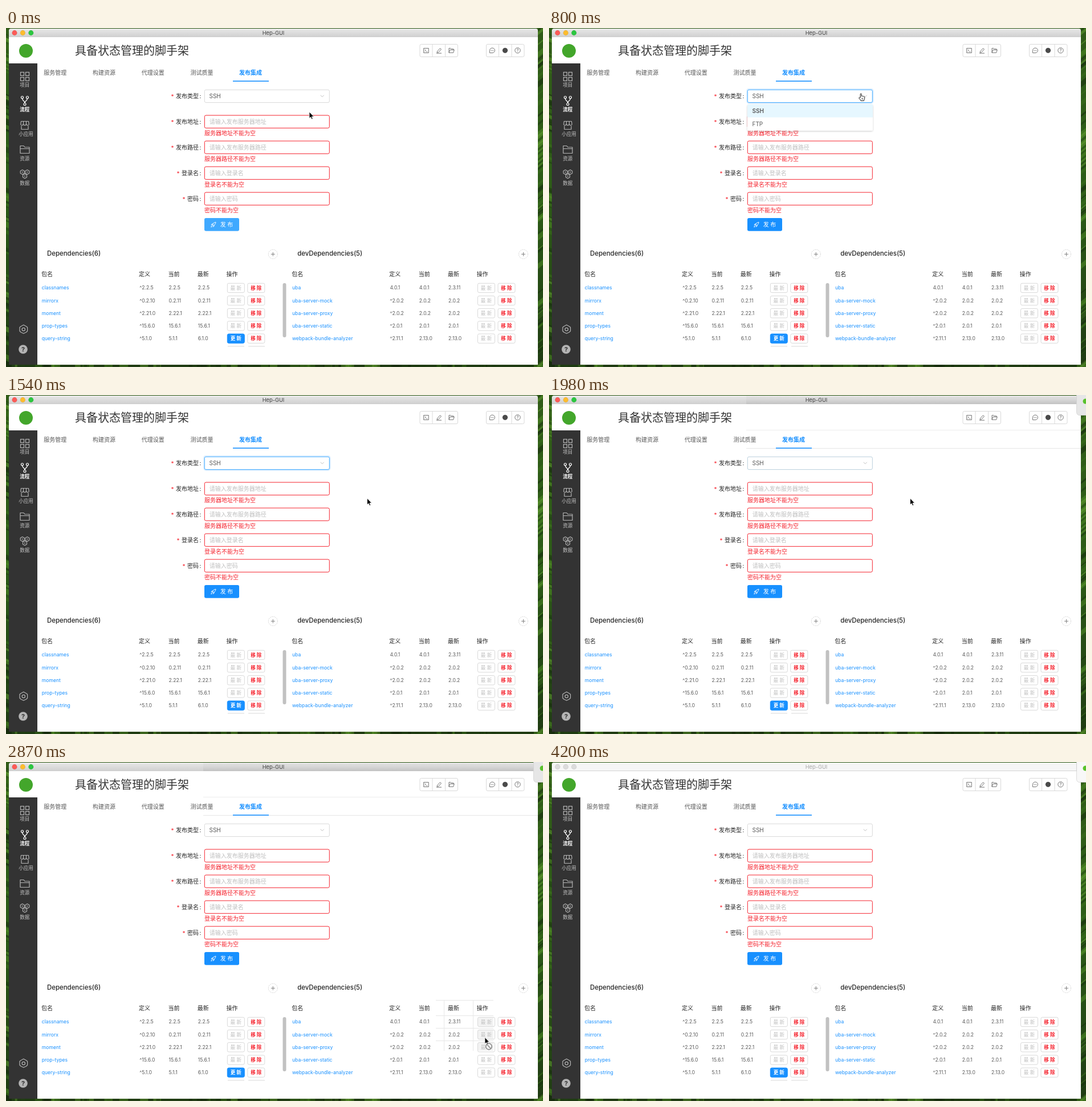
An HTML page that plays this animation: 942 by 594 pixels, repeating every 4300 ms.

```html
<!DOCTYPE html>
<html lang="zh-CN">
<head>
<meta charset="utf-8">
<title>Hep-GUI</title>
<style>
html, body { margin: 0; width: 100%; height: 100%; overflow: hidden; background: #fff; }
svg { display: block; width: 942px; height: 594px; }
text { font-family: Inter, "Noto Sans CJK SC", "Noto Sans CJK", sans-serif; white-space: pre; }
</style>
</head>
<body>
<svg id="stage" viewBox="0 0 942 594" xmlns="http://www.w3.org/2000/svg"></svg>
<script>
const LOOP = 4300;
const BLUE = '#1890ff', RED = '#f5222d', LINE = '#d9d9d9', INK = '#595959', DARK = '#262626';
const stage = document.getElementById('stage');

// ---- markup helpers ----
const rect = (x, y, w, h, fill, extra = '') =>
  `<rect x="${x}" y="${y}" width="${w}" height="${h}" fill="${fill}" ${extra}/>`;
const circle = (x, y, r, fill, extra = '') =>
  `<circle cx="${x}" cy="${y}" r="${r}" fill="${fill}" ${extra}/>`;
const path = (d, stroke, width = 1, fill = 'none') =>
  `<path d="${d}" fill="${fill}" stroke="${stroke}" stroke-width="${width}" stroke-linejoin="round"/>`;
// y is the optical middle of the line
const text = (s, x, y, size, fill, weight = 400, anchor = 'start') =>
  `<text x="${x}" y="${(y + size * 0.37).toFixed(2)}" font-size="${size}" fill="${fill}" font-weight="${weight}" text-anchor="${anchor}">${s}</text>`;
const box = (x, y, w, h, stroke, fill = 'none', r = 2.5) =>
  rect(x, y, w, h, fill, `rx="${r}" stroke="${stroke}"`);
const group = (id, body, extra = '') => `<g id="${id}" ${extra}>${body}</g>`;
const at = (x, y, body) => `<g transform="translate(${x} ${y})">${body}</g>`;

function wallpaper() {
  let seed = 11, out = rect(0, 0, 942, 594, 'url(#field)');
  const rnd = () => (seed = (seed * 16807) % 2147483647) / 2147483647;
  const tones = ['#4f8a24', '#1c3a10', '#3b6f1c', '#16290d', '#5f9a30'];
  for (let i = 0; i < 130; i++) {
    const y = rnd() * 594, h = 2 + rnd() * 9, c = tones[Math.floor(rnd() * 5)];
    const left = i % 2, x = left ? -1 : 932, dy = left ? 5 : -9;
    out += `<path d="M${x} ${y}l11 ${dy}v${h}l-11 ${-dy}z" fill="${c}" opacity=".55"/>`;
  }
  for (let i = 0; i < 70; i++) {
    out += rect(rnd() * 942, 590, 3 + rnd() * 14, 4, tones[Math.floor(rnd() * 5)], 'opacity=".45"');
  }
  return out;
}

function titleBar() {
  const lights = (a, b, c) => [a, b, c].map((f, i) =>
    circle(15 + i * 14.4, 8.5, 4.4, f, 'stroke="#000" stroke-opacity=".12" stroke-width=".6"')).join('');
  const name = fill => text('Hep-GUI', 469, 8.6, 9.3, fill, 400, 'middle');
  return rect(5, 1, 928, 20, 'url(#bar)', 'rx="3.5"') +
    group('barDark', rect(346, 1, 579, 15, 'url(#barDeep)')) +
    group('barActive', lights('#fc5b57', '#fdbc2e', '#2cc740') + name('#404040')) +
    group('barIdle', rect(5, 1, 921, 15, '#f6f6f6', 'rx="3.5"') + rect(5, 15, 921, 1, '#d4d4d4') +
      lights('#dcdcdc', '#dcdcdc', '#dcdcdc') + name('#a8a8a8') + rect(925, 1, 1, 15, '#b5b5b5'));
}

function sidebar() {
  const c = '#b4b4b4';
  const cells = [[0, 0], [9, 0], [0, 9], [9, 9]].map(([x, y]) =>
    rect(25.5 + x, 77.5 + y, 6, 6, 'none', `stroke="${c}" stroke-width="1.2"`)).join('');
  const ring = (x, y, s) => circle(x, y, 2, 'none', `stroke="${s}" stroke-width="1.2"`);
  const branch = ring(28.5, 121.5, '#fff') + ring(37.5, 121.5, '#fff') + ring(33, 133.5, '#fff') +
    path('M28.5 123.5C28.5 128 33 127 33 131.5C33 127 37.5 128 37.5 123.5', '#fff', 1.3);
  const shop = path('M26.5 163.5h13l.8 5.5q-2 3-4.8 0q-2.5 3-5 0q-2.800 3-4.800 0zM30.500 163.500v5.500M35.500 163.500v5.500M27 171.500v6h12v-6', c, 1.2);
  const folder = path('M25 219.500v-13h6l2 2.500h8v10.500zM25 211.500h16', c, 1.2);
  const hive = [[28.7, 252.5], [37.3, 252.5], [33, 259.5]].map(([x, y]) =>
    path(`M${x - 3.5} ${y - 2}l3.500-2l3.500 2v4l-3.500 2l-3.500-2z`, c, 1.1) + circle(x, y, 1, c)).join('');
  const labels = [['项目', 100], ['流程', 143], ['小应用', 186], ['资源', 229], ['数据', 272]].map(([s, y], i) =>
    text(s, i === 2 ? 35 : 32.7, y, 8.57, i === 1 ? '#fff' : '#c4c4c4', i === 1 ? 700 : 400, 'middle')).join('');
  const gear = path('M28.500 521.500l2.300-1.300l2.300 1.300l2.700 1.500l1.800 1.500v6.500l-2 2l-4.800 2.300l-4.800-2.300l-2-2v-6.500l1.800-1.500z', c, 1.2) +
    circle(30.800, 528, 2.700, 'none', `stroke="${c}" stroke-width="1.2"`);
  return rect(5, 62, 50, 528, '#333') + cells + branch + shop + folder + hive + labels + gear +
    circle(30, 563, 7.8, '#b4b4b4') + text('?', 30, 563.2, 11, '#333', 700, 'middle');
}

function header() {
  const g = '#666';
  const trio = x => box(x, 28.5, 66.5, 22, LINE) + path(`M${x + 22} 28.500v22M${x + 44.500} 28.500v22`, LINE);
  const icons =
    at(737, 39.5, path('M-4.300-4h8.600v8h-8.600zM-2.500-2l2 1.800l-2 1.800M.3 2h2', g, .9)) +
    at(759.5, 39.5, path('M-3 1.500l5-5.500l2 1.800l-5 5.400l-2.500.5zM-4.500 4.700h9', g, .9)) +
    at(781.5, 39.5, path('M-4.500 3.800v-7.800h3l1 1.300h4v2M-4.500 3.800l1.800-5h7.500l-1.600 5z', g, .9)) +
    at(853, 39.3, path('M-4.500 4.300v-4.300a4.500 4.300 0 1 1 4.500 4.300z', g, .9) +
      [-2, 0, 2].map(x => circle(x, 0, .65, g)).join('')) +
    circle(875.5, 39.3, 4.6, '#4a4a4a') +
    circle(897.5, 39.3, 4.7, 'none', `stroke="${g}" stroke-width=".9"`) + text('?', 897.5, 39.4, 7, g, 500, 'middle');
  const tabs = ['服务管理', '构建资源', '代理设置', '测试质量', '发布集成'].map((s, i) =>
    text(s, 66.3 + i * 85.7, 78.5, 10, i === 4 ? BLUE : INK, i === 4 ? 700 : 400)).join('');
  return circle(35, 40, 12, '#43a62b') + text('具备状态管理的脚手架', 121, 39.5, 20, '#333', 300) +
    trio(726) + trio(842.5) + icons +
    group('rules', rect(346, 61, 587, 1, '#ececec') + rect(346, 93, 587, 1, '#e6e6e6')) +
    tabs + rect(398, 92.3, 63, 1.6, BLUE);
}

function form() {
  const fields = [['发布类型'], ['发布地址', '请输入发布服务器地址', '服务器地址不能为空'],
    ['发布路径', '请输入发布服务器路径', '服务器路径不能为空'],
    ['登录名', '请输入登录名', '登录名不能为空'], ['密码', '请输入密码', '密码不能为空']];
  let out = '';
  fields.forEach(([label, hint, error], i) => {
    const y = 119.3 + i * 45;
    out += text('*', 334 - label.length * 10 - 4.5, y + .8, 10, RED) +
      text(label, 338, y, 10, DARK, 400, 'end') + text(':', 339.500, y, 10, DARK);
    if (!hint) return;
    out += box(348.3, y - 11.3, 219, 22.3, RED, '#fff') + text(hint, 356.7, y + .2, 10, '#bfbfbf') +
      text(error, 348, y + 20, 10, RED);
  });
  const select = rect(347, 106.8, 221.6, 25, 'none', 'id="glow" rx="3.500" stroke="#1890ff" stroke-opacity=".2" stroke-width="1.4"') +
    rect(348.3, 108.3, 219, 22.3, '#fff', 'id="select" rx="2.500"') + text('SSH', 356.5, 119.4, 10, INK) +
    `<path id="chevron" fill="none" stroke="#bfbfbf" stroke-width="1"/>`;
  const button = rect(348, 333, 61, 22.8, BLUE, 'id="publish" rx="2.800"') +
    at(364, 344.6, path('M-1.800.5q1-4.500 5.800-5q-.3 5-5 6zM-1.800.5l-2.200.2l1.600-2.300h1.500M-.8 1.500l.2 2.300l2-1.500v-1.500M-3.300 2.200l-1 2l2-.8', '#fff', .9)) +
    text('发 布', 387, 344.6, 10, '#fff', 500, 'middle');
  const menu = rect(348, 134, 220, 46, '#fff', 'rx="2.500" filter="url(#shadow)"') +
    rect(348, 134, 220, 22.6, '#e6f7ff') + text('SSH', 356.5, 145.2, 10, INK, 600) + text('FTP', 356.5, 168, 10, INK);
  return out + select + button + group('menu', menu);
}

const rowY = i => 455.3 + i * 22.17;

function table(dx, title, rows) {
  const pill = (x, y, s, stroke, fill, ink) => box(x, y - 8, 30, 16.3, stroke, fill) +
    text(s, x + 15, y + .2, 8.57, ink, ink === '#bfbfbf' ? 400 : 600, 'middle');
  let out = text(title, 72 + dx, 395.2, 11.43, DARK, 500);
  const px = 468.3 + dx;
  out += circle(px, 396.3, 8, '#fff', 'stroke="#ccc" stroke-width=".8" stroke-dasharray="2 1.200"') +
    path(`M${px - 3.5} 396.300h7M${px} 392.800v7`, '#777', .9);
  [['包名', 62], ['定义', 233], ['当前', 284.5], ['最新', 335.7], ['操作', 386.5]].forEach(([s, x]) => {
    out += text(s, x + dx, 431.5, 10, DARK, 500);
  });
  rows.forEach((row, i) => {
    const [name, ...versions] = row.split(' '), y = rowY(i), stale = name === 'query-string';
    out += text(name, 62.8 + dx, y, 8.57, BLUE);
    versions.forEach((v, k) => out += text(v, 234.2 + dx + k * 51.3, y, 8.57, INK));
    out += (stale ? pill(388.3 + dx, y, '更 新', BLUE, BLUE, '#fff')
      : pill(388.3 + dx, y, '最 新', LINE, 'none', '#bfbfbf')) +
      pill(423.8 + dx, y, '移 除', LINE, 'none', RED);
  });
  return out;
}

function grid() {
  let out = '';
  for (let i = 0; i < 5; i++)
    for (const x of [827.3, 862.8]) out += rect(x, rowY(i) - 8, 30, 16.3, '#f3f3f3', 'rx="2.500"');
  [417, 444, 466, 488, 510, 532, 555].forEach(y => out += rect(502, y, 408, 1, '#e6e6e6'));
  [666, 717, 768, 819].forEach(x => out += rect(x, 417, 1, 138, '#e8e8e8'));
  return out;
}

const patches = [[2870, 754, 417, 101, 89], [3010, 502, 469, 391, 79], [3160, 530, 488, 375, 72]];

function pointers() {
  const arrow = '<path d="M0 0v11.300l2.600-2.300l1.700 3.900l1.900-.8l-1.700-3.800h3.500z" fill="#000" stroke="#fff" stroke-width=".8"/>';
  const hand = '<path d="M3.200 7.500v-5.800q0-1.200 1-1.200t1.100 1.200v3.200q1.800-.7 2.200.4q1.500-.5 1.900.6q1.400-.2 1.400 1.200q0 2.800-1.500 5.800h-5.300q-.8-2-3.500-4.800q.9-1.700 2.700-.6z" fill="#fff" stroke="#000" stroke-width=".9" stroke-linejoin="round"/>' +
    path('M5.800 8v3M7.500 8v3', '#000', .6);
  const ban = circle(7, 16, 5.3, '#fff', 'fill-opacity=".6" stroke="#8c8c8c" stroke-width="1.700"') + path('M3.300 12.300l7.400 7.400', '#8c8c8c', 1.5);
  return group('pointer', group('hand', hand) + group('arrow', arrow) + group('ban', ban));
}

stage.innerHTML = `<defs>
  <linearGradient id="field" x2="0" y2="1"><stop stop-color="#315c18"/><stop offset=".5" stop-color="#2d5c17"/><stop offset="1" stop-color="#203c13"/></linearGradient>
  <linearGradient id="bar" x2="0" y2="1"><stop stop-color="#e9e9e9"/><stop offset=".72" stop-color="#d0d0d0"/><stop offset=".78" stop-color="#b8b8b8"/></linearGradient>
  <linearGradient id="barDeep" x2="0" y2="1"><stop stop-color="#e4e4e4"/><stop offset=".5" stop-color="#d6d6d6"/><stop offset="1" stop-color="#c2c2c2"/></linearGradient>
  <filter id="shadow" x="-10%" y="-20%" width="120%" height="150%"><feDropShadow dx="0" dy="1" stdDeviation="1.800" flood-opacity=".2"/></filter>
  ${patches.map(([, x, y, w, h], i) => `<clipPath id="cut${i}">${rect(x, y, w, h, '#000')}</clipPath>`).join('')}
</defs>` + wallpaper() + titleBar() + rect(5, 16, 928, 574, '#fff') + sidebar() + header() + form() +
  patches.map((p, i) => group('patch' + i, grid(), `clip-path="url(#cut${i})"`)).join('') +
  table(0, 'Dependencies(6)', ['classnames ^2.2.5 2.2.5 2.2.5', 'mirrorx ^0.2.10 0.2.11 0.2.11',
    'moment ^2.21.0 2.22.1 2.22.1', 'prop-types ^15.6.0 15.6.1 15.6.1', 'query-string ^5.1.0 5.1.1 6.1.0']) +
  path('M389 557.800h29M425 557.800h29', LINE) +
  rect(485.5, 447, 6, 95, '#c1c1c1', 'rx="3"') +
  table(439.2, 'devDependencies(5)', ['uba 4.0.1 4.0.1 2.3.11', 'uba-server-mock ^2.0.2 2.0.2 2.0.2',
    'uba-server-proxy ^2.0.2 2.0.2 2.0.2', 'uba-server-static ^2.0.1 2.0.1 2.0.1',
    'webpack-bundle-analyzer ^2.11.1 2.13.0 2.13.0']) +
  group('toast', rect(925.5, -8, 30, 43.5, '#e9e9e9', 'id="toastBox" rx="5" stroke="#cfcfcf" stroke-width=".7"') +
    circle(941, 11, 4.5, '#59c22c')) +
  pointers();

// ---- timeline: each entry holds until the next ----
const moves = [[0, 'arrow', 532, 147], [140, 'arrow', 539.5, 133], [350, 'hand', 543, 114.5], [1250, 'hand', 547, 115],
  [1400, 'arrow', 629.5, 177.5], [1540, 'arrow', 633.5, 181], [2570, 'arrow', 635, 181], [2720, 'arrow', 756, 349],
  [2870, 'ban', 840, 482.5], [3010, 'arrow', 885, 535], [3160, 'arrow', 896, 581.5], [3300, 'arrow', 902, 587.5], [3450, '']];
const borders = [[0, LINE], [350, '#8cc8fa'], [500, '#40a9ff'], [1980, '#b9cfdd'], [2130, LINE]];
const menuSteps = [[0, 0, 1], [500, .6, .9], [650, .96, .99], [800, 1, 1], [1400, .9, .95], [1540, 0, 1]];
const buttonFill = [[0, '#40a9ff'], [140, '#2c9dff'], [650, BLUE]];
const held = (steps, t) => steps.filter(s => s[0] <= t).pop();

const el = id => document.getElementById(id);
const show = (id, on) => el(id).setAttribute('display', on ? 'inline' : 'none');
const set = (id, key, value) => el(id).setAttribute(key, value);

function draw(t) {
  const idle = t >= 4200, late = t >= 1980 && !idle;
  show('barDark', late);
  show('barActive', !idle);
  show('barIdle', idle);
  show('rules', late);
  show('toast', t >= 1980);
  set('toastBox', 'fill', idle ? '#f8f8f8' : '#e6e6e6');

  set('select', 'stroke', held(borders, t)[1]);
  show('glow', t >= 650 && t < 1980);
  const up = t >= 950 && t < 1400;
  set('chevron', 'd', up ? 'M551.800 120.700l2.900-3l2.900 3' : 'M551.800 117.700l2.900 3l2.900-3');
  set('publish', 'fill', held(buttonFill, t)[1]);

  const [, alpha, scale] = held(menuSteps, t);
  show('menu', alpha > 0);
  set('menu', 'opacity', alpha);
  set('menu', 'transform', `translate(0 ${134 * (1 - scale)}) scale(1 ${scale})`);

  patches.forEach(([start], i) => show('patch' + i, t >= start && !idle));

  const [, kind, x, y] = held(moves, t);
  show('pointer', kind);
  if (kind) set('pointer', 'transform', `translate(${x} ${y})`);
  show('hand', kind === 'hand');
  show('arrow', kind === 'arrow' || kind === 'ban');
  show('ban', kind === 'ban');
}

const begin = performance.now();
function tick() {
  draw((performance.now() - begin) % LOOP);
  requestAnimationFrame(tick);
}
tick();
</script>
</body>
</html>
```
